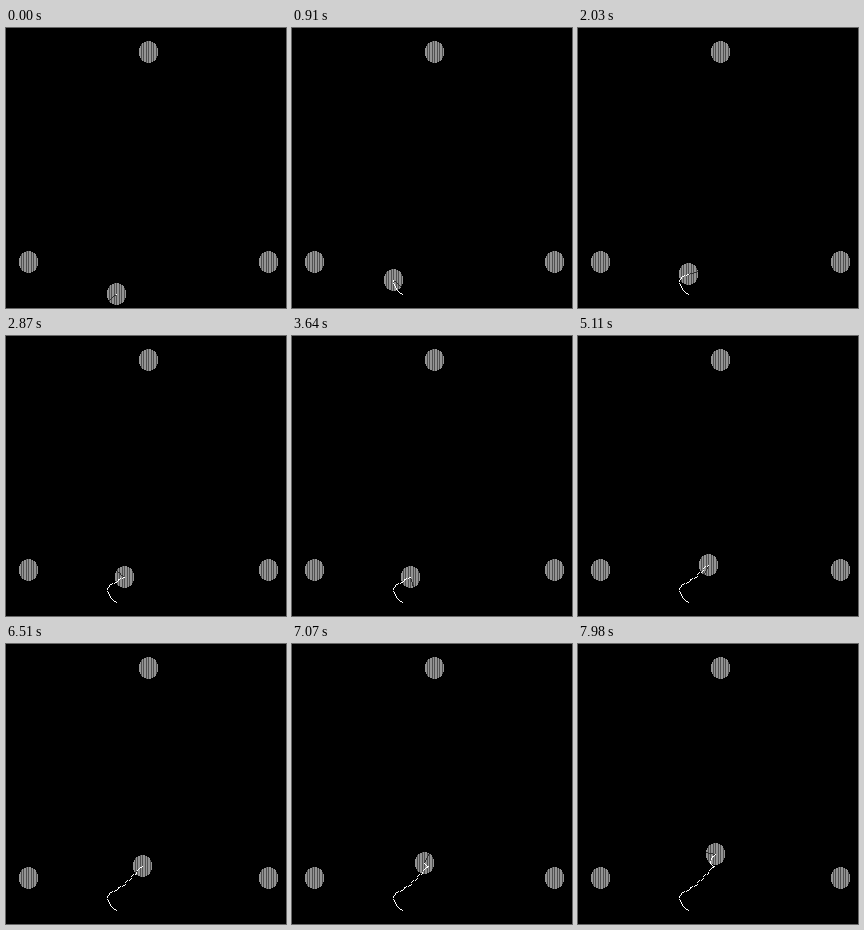
Write an HTML page with a canvas that moves like this. It is 280 by 280 pixels and loops after 8000 ms.

```html
<!DOCTYPE html>
<html lang="en">
<head>
<meta charset="utf-8">
<title>Walker and beacons</title>
<style>
  html, body { margin: 0; width: 100%; height: 100%; overflow: hidden; background: #000; }
  canvas { display: block; }
</style>
</head>
<body>
<canvas id="stage" width="280" height="280"></canvas>
<script>
const ctx = document.getElementById('stage').getContext('2d');
const LOOP = 8000, STEP = 70;
const FIRST_HOP = 840, HOP_EVERY = 958;
const NEEDLE_START = 144, NEEDLE_TURN = 19.35; // degrees, degrees per step
const BOW = 0.24; // how far each hop curves to its left

const beacons = [[142, 24], [22, 234], [262, 234]];
const path = [
  [110, 266], [101, 252], [110, 246], [118, 241], [124, 235],
  [130, 229], [136, 222], [132, 219], [137, 210]
];

function dot(x, y) {
  ctx.fillRect(Math.round(x), Math.round(y), 1, 1);
}

function curve([x0, y0], [x1, y1], bow = 0) {
  const dx = x1 - x0, dy = y1 - y0;
  const n = Math.ceil(Math.max(Math.abs(dx), Math.abs(dy), 1));
  for (let i = 0; i <= n; i++) {
    const t = i / n, bend = 2 * t * (1 - t) * bow;
    dot(x0 + dx * t + dy * bend, y0 + dy * t - dx * bend);
  }
}

function ball([x, y]) {
  for (let dx = -9; dx <= 9; dx++) {
    const half = Math.round(11 * Math.sqrt(1 - (dx / 9.7) ** 2));
    const dark = (dx + 10) * 0.4 % 1 < 0.4;
    ctx.fillStyle = dark ? '#505050' : '#949494';
    ctx.fillRect(x + dx, y - half, 1, 2 * half);
  }
}

function draw(time) {
  ctx.fillStyle = '#000';
  ctx.fillRect(0, 0, 280, 280);
  beacons.forEach(ball);

  const hops = Math.max(0, Math.floor((time - FIRST_HOP) / HOP_EVERY) + 1);
  const here = path[hops];
  ball(here);

  const angle = (NEEDLE_START + time / STEP * NEEDLE_TURN) * Math.PI / 180;
  ctx.fillStyle = '#303030';
  curve(here, [here[0] + 9 * Math.cos(angle), here[1] + 10 * Math.sin(angle)]);

  ctx.fillStyle = '#fff';
  dot(...path[0]);
  for (let i = 0; i < hops; i++) curve(path[i], path[i + 1], BOW);
}

const start = performance.now();
function tick() {
  const time = (performance.now() - start) % LOOP;
  draw(Math.floor(time / STEP) * STEP);
  requestAnimationFrame(tick);
}
tick();
</script>
</body>
</html>
```
